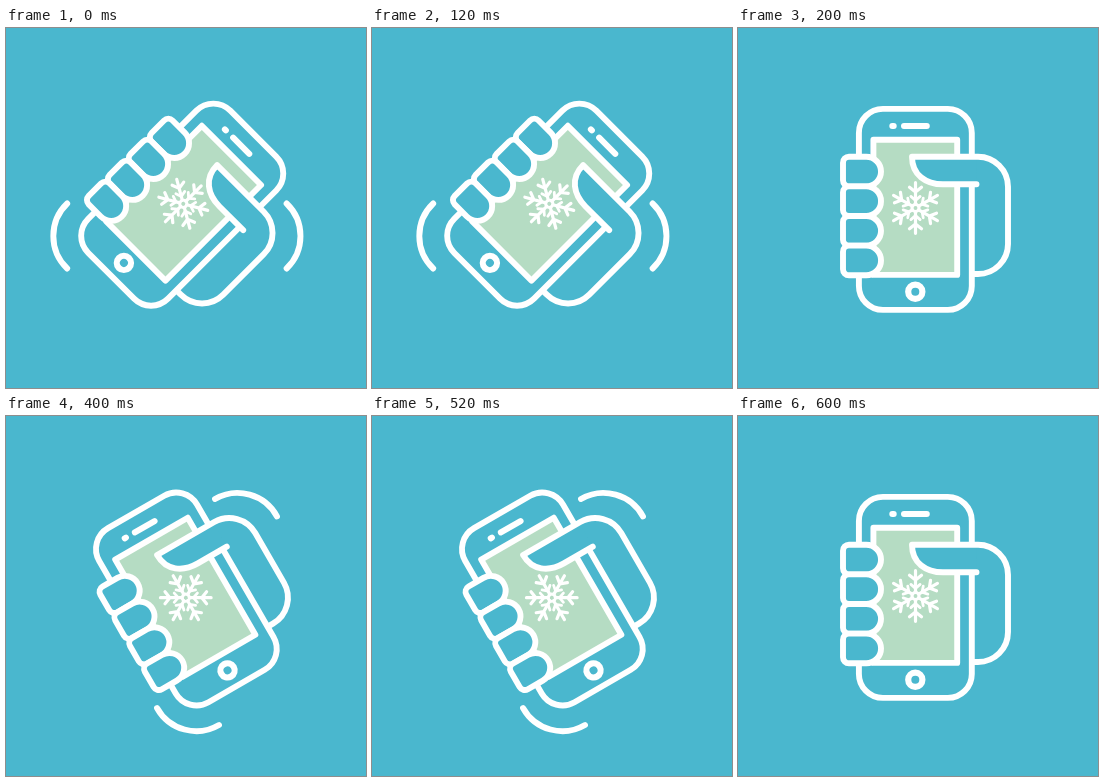
Animation of 360x360 px, one loop 800 ms. Source, as an HTML page:

```html
<!DOCTYPE html>
<html lang="en">
<head>
<meta charset="utf-8">
<title>Shake the phone</title>
<style>
  html, body { margin: 0; width: 100%; height: 100%; overflow: hidden; background: #4ab7ce; }
  svg { display: block; width: 100vw; height: 100vh; }
</style>
</head>
<body>
<svg viewBox="0 0 360 360" fill="none" stroke="#fff" stroke-width="5.9" stroke-linecap="round" stroke-linejoin="round">
  <rect width="360" height="360" fill="#4ab7ce" stroke="none"/>
  <!-- everything in the device group is relative to the snowflake centre -->
  <g id="device">
    <g transform="translate(-177.5 -180)">
      <rect x="120.9" y="80.9" width="112.9" height="201" rx="24" fill="#4ab7ce"/>
      <rect x="135.4" y="111.7" width="83.8" height="135.2" fill="#b5dcc3"/>
      <path d="M154.3 98H155.7M166 98H188.8" stroke-width="6"/>
      <circle cx="177.3" cy="263.8" r="7.1" stroke-width="6.2"/>
    </g>
    <g id="flake" stroke-width="3.2"></g>
    <g transform="translate(-177.5 -180)" fill="#4ab7ce">
      <path d="M238.5 156.3H205C188 156.3 174 147 174 128.7H239" stroke="none"/>
      <path d="M238.5 156.3H205C188 156.3 174 147 174 128.7H240A30 30 0 0 1 270 158.7V216A30 30 0 0 1 240 246H236" fill="none"/>
      <g id="fingers"></g>
    </g>
  </g>
  <g id="sides">
    <path d="M61.2 175.5A45 45 0 0 0 61.2 240.5"/>
    <path d="M280.6 175.5A45 45 0 0 1 280.6 240.5"/>
  </g>
  <g id="ends">
    <path d="M209 83A45 45 0 0 1 271 100.5"/>
    <path d="M151 292A45 45 0 0 0 213 309"/>
  </g>
</svg>
<script>
  const LOOP = 800;
  const get = id => document.getElementById(id);
  const device = get("device"), sides = get("sides"), ends = get("ends");

  const poses = [
    { x: 177.3, y: 175.8, angle: 45, arcs: sides },
    { x: 177.5, y: 180, angle: 0 },
    { x: 179.8, y: 181.7, angle: -30, arcs: ends },
    { x: 177.5, y: 180, angle: 0 }
  ];

  const repeat = (n, draw) => Array.from({ length: n }, (_, i) => draw(i)).join("");

  get("flake").innerHTML = repeat(6, i =>
    `<g transform="rotate(${i * 60})">
      <path d="M0 -3.6V-25.3M-6 -20.8L0 -16L6 -20.8"/>
      <path d="M-4.6 -11.6L0 -7.6L4.6 -11.6" stroke-width="2.8"/>
    </g>`) + `<circle r="3.6" stroke-width="3"/>`;

  const step = 29.65;
  get("fingers").innerHTML = repeat(4, i =>
    `<path d="M111 ${128.7 + i * step}H128.2a14.825 14.825 0 0 1 0 ${step}H111a6 6 0 0 1 -6 -6v${12 - step}a6 6 0 0 1 6 -6z"/>`);

  function render(time) {
    const pose = poses[Math.floor(time % LOOP / (LOOP / poses.length))];
    device.setAttribute("transform", `translate(${pose.x} ${pose.y}) rotate(${pose.angle})`);
    for (const arcs of [sides, ends])
      arcs.setAttribute("visibility", arcs === pose.arcs ? "visible" : "hidden");
  }

  const start = performance.now();
  function tick(now) {
    render(Math.max(0, now - start));
    requestAnimationFrame(tick);
  }
  render(0);
  requestAnimationFrame(tick);
</script>
</body>
</html>
```
